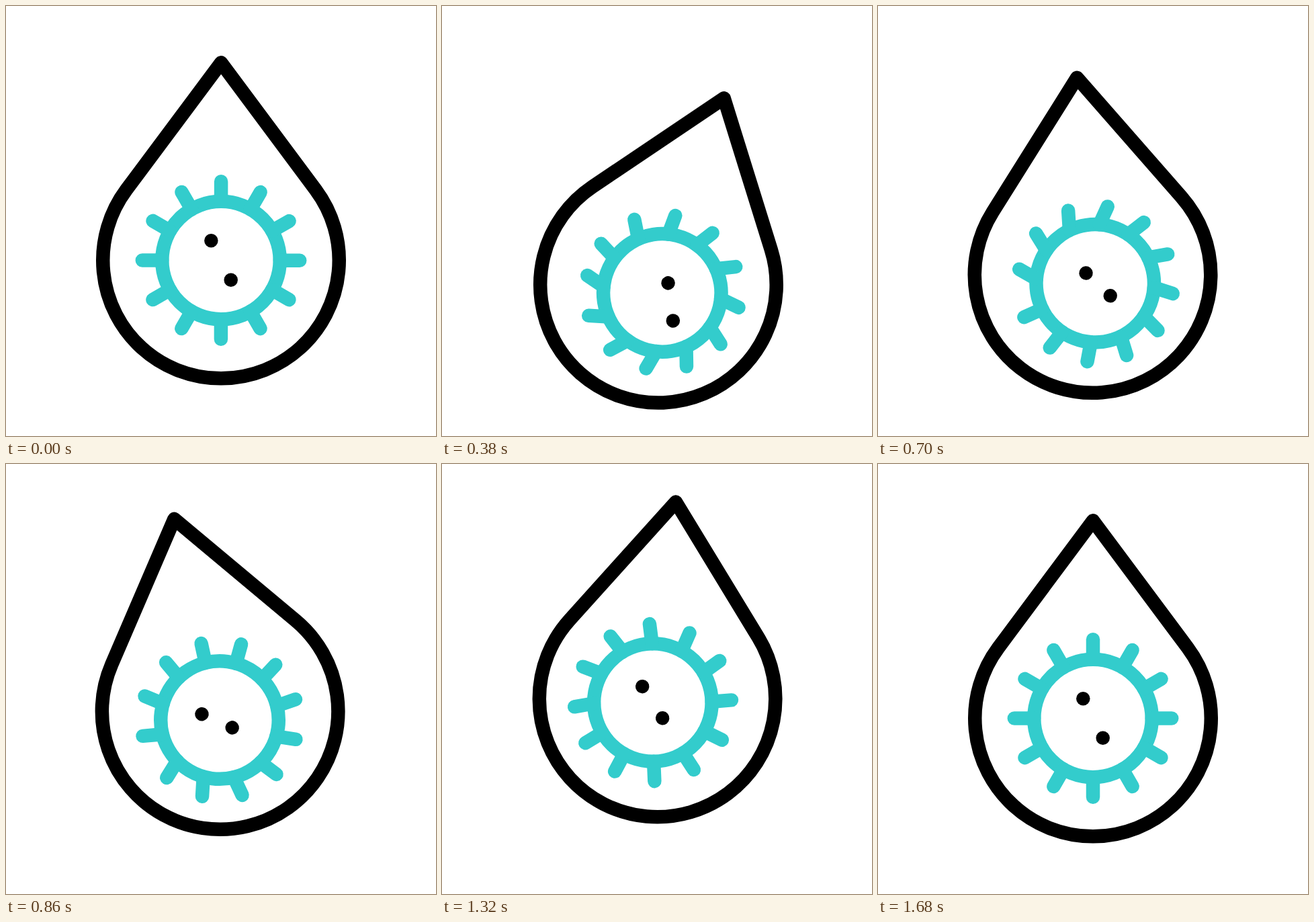
Recreate the animation shown at these times as an HTML page without scripts. Size 640 by 640 pixels, loop 1700 ms.

```html
<!DOCTYPE html>
<html lang="en">
<head>
<meta charset="utf-8">
<title>Virus in a drop</title>
<style>
  html, body { margin: 0; width: 100%; height: 100%; overflow: hidden; background: #fff; }
  svg { display: block; width: 100%; height: 100%; fill: none; stroke-width: 20.5; stroke-linecap: round; stroke-linejoin: round; }

  :root {
    --soft: cubic-bezier(.333, .167, .667, .833);
    --back: cubic-bezier(.33, .3, .67, .95);
  }
  .drop, .swayx, .swayy, .turn, .spike, .dot {
    animation: 1700ms var(--soft) infinite;
  }

  .drop { transform-origin: 0 6px; animation-name: bob, tilt; }
  .swayx { animation-name: swayx; }
  .swayy { animation-name: swayy; }
  .turn { animation-name: turn; }
  .spike { transform-origin: 0 -87.75px; animation-name: bend; animation-delay: calc(var(--k) * 20ms); }
  .dot { fill: #000; r: 10.25px; }
  .upper { cx: -14.7px; cy: -29.3px; animation-name: upperx, uppery; }
  .lower { cx: 14.7px; cy: 29.3px; animation-name: lowerx, lowery; }

  @keyframes bob {
    0%, 98.06%, 100% { translate: 0 0; }
    30.9% { translate: 0 46.7px; }
    64.2% { translate: 0 -46.5px; }
  }
  @keyframes tilt {
    0%, 98.06%, 100% { rotate: 0deg; }
    24.53% { rotate: 20.5deg; }
    49% { rotate: -14.2deg; }
    74% { rotate: 6deg; }
  }

  @keyframes swayx {
    0%, 98.06%, 100% { translate: 0 0; }
    26% { translate: 10.5px 0; }
    63.7% { translate: -10px 0; }
  }
  @keyframes swayy {
    0%, 98.06%, 100% { translate: 0 0; }
    24.53% { translate: 0 10px; animation-timing-function: cubic-bezier(.33, .4, .67, 1); }
    44.1% { translate: 0 13.1px; animation-timing-function: cubic-bezier(.33, 0, .67, .6); }
    63.7% { translate: 0 10px; }
  }
  @keyframes turn {
    0%, 98.06%, 100% { rotate: 0deg; }
    27.2% { rotate: 19.1deg; }
    63.7% { rotate: -10deg; }
  }
  @keyframes bend {
    0%, 79.1%, 100% { rotate: 0deg; }
    24.53% { rotate: 30deg; }
    52.94% { rotate: -16.5deg; }
  }

  @keyframes upperx {
    0%, 98.06%, 100% { cx: -14.7px; }
    24.53% { cx: 14.5px; }
    63.7% { cx: -45px; animation-timing-function: var(--back); }
  }
  @keyframes uppery {
    0% { cy: -29.3px; animation-timing-function: cubic-bezier(.33, 0, .67, .75); }
    24.53% { cy: -5.3px; animation-timing-function: linear; }
    63.7% { cy: -.6px; animation-timing-function: cubic-bezier(.33, .45, .67, .95); }
    98.06%, 100% { cy: -29.3px; }
  }
  @keyframes lowerx {
    0%, 98.06%, 100% { cx: 14.7px; }
    24.53% { cx: 39.8px; }
    63.7% { cx: .2px; animation-timing-function: var(--back); }
  }
  @keyframes lowery {
    0%, 98.06%, 100% { cy: 29.3px; }
    24.53% { cy: 44.2px; animation-timing-function: cubic-bezier(.33, .4, .67, .95); }
    63.7% { cy: 24px; animation-timing-function: cubic-bezier(.33, .9, .67, 1); }
  }
</style>
</head>
<body>
<svg viewBox="0 0 640 640">
  <g transform="translate(320 378.5)">
    <g class="drop">
      <path stroke="#000" d="M0-294.2 140.9-105A175.75 175.75 0 1 1-140.9-105Z"/>
      <g class="swayx"><g class="swayy"><g class="turn" stroke="#3cc">
        <circle r="87.75"/>
        <!-- --k counts the delay steps of the wave -->
        <g transform="rotate(240)"><path class="spike" style="--k:0" d="M0-87.75V-117.2"/></g>
        <g transform="rotate(210)"><path class="spike" style="--k:1" d="M0-87.75V-117.2"/></g>
        <g transform="rotate(180)"><path class="spike" style="--k:2" d="M0-87.75V-117.2"/></g>
        <g transform="rotate(150)"><path class="spike" style="--k:3" d="M0-87.75V-117.2"/></g>
        <g transform="rotate(120)"><path class="spike" style="--k:4" d="M0-87.75V-117.2"/></g>
        <g transform="rotate(90)"><path class="spike" style="--k:5" d="M0-87.75V-117.2"/></g>
        <g transform="rotate(60)"><path class="spike" style="--k:6" d="M0-87.75V-117.2"/></g>
        <g transform="rotate(30)"><path class="spike" style="--k:7" d="M0-87.75V-117.2"/></g>
        <g><path class="spike" style="--k:8" d="M0-87.75V-117.2"/></g>
        <g transform="rotate(330)"><path class="spike" style="--k:9" d="M0-87.75V-117.2"/></g>
        <g transform="rotate(300)"><path class="spike" style="--k:10" d="M0-87.75V-117.2"/></g>
        <g transform="rotate(270)"><path class="spike" style="--k:11" d="M0-87.75V-117.2"/></g>
      </g></g></g>
      <circle class="dot upper" r="10.25"/>
      <circle class="dot lower" r="10.25"/>
    </g>
  </g>
</svg>
</body>
</html>
```
